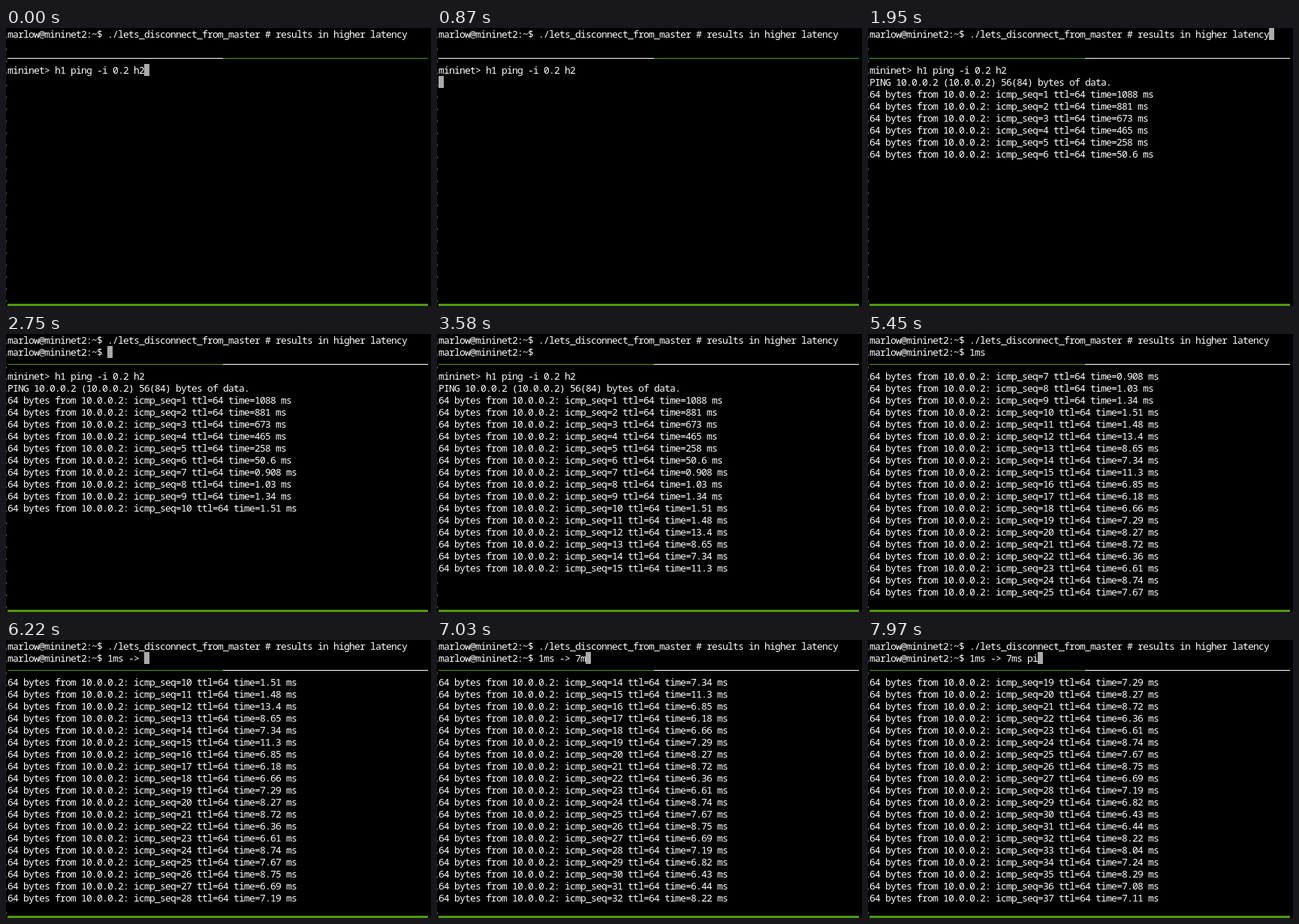
Write an HTML page that moves like this. It is 566 px wide and 371 px high and loops after 8 s.

```html
<!DOCTYPE html>
<html lang="en">
<head>
<meta charset="utf-8">
<style>
  html, body { margin: 0; width: 100%; height: 100%; overflow: hidden; background: #000; }
  div, pre { position: absolute; margin: 0; }
  pre { left: 2px; color: #fff; font: 13px/16px "Noto Sans Mono", monospace; letter-spacing: -.8px; font-variant-ligatures: none; }
  #shell { top: 0; }
  #ping { top: 48px; }
  #cursor { width: 7px; height: 16px; background: #aaa; }
  .rule { top: 40px; height: 1px; }
  #left { left: 2px; width: 287px; }
  #right { left: 289px; width: 273px; }
  #bar { left: 2px; top: 368px; width: 560px; height: 3px; background: #4e9a06; }
  #edge { left: 0; top: 0; width: 1px; height: 368px;
    background: repeating-linear-gradient(#000 0 11px, #554 11px 14px, #000 14px 16px); }
</style>
</head>
<body>
<div id="edge"></div>
<div id="left" class="rule"></div>
<div id="right" class="rule"></div>
<div id="bar"></div>
<div id="cursor"></div>
<pre id="shell"></pre>
<pre id="ping"></pre>
<script>
const LOOP = 8000, COL = 7, ROW = 16, PANE_ROW = 3;
const GREEN = '#4e9a06', WHITE = '#fff';
const $ = id => document.getElementById(id);

const prompt = 'marlow@mininet2:~$ ';
const command = prompt + './lets_disconnect_from_master # results in higher latency';
const header = ['mininet> h1 ping -i 0.2 h2', 'PING 10.0.0.2 (10.0.0.2) 56(84) bytes of data.'];

const latencies = ('1088 881 673 465 258 50.6 0.908 1.03 1.34 1.51 1.48 13.4 8.65 7.34 11.3 6.85 6.18 6.66 7.29 ' +
  '8.27 8.72 6.36 6.61 8.74 7.67 8.75 6.69 7.19 6.82 6.43 6.44 8.22 8.04 7.24 8.29 7.08 7.11').split(' ');
const replies = latencies.map((ms, i) => `64 bytes from 10.0.0.2: icmp_seq=${i + 1} ttl=64 time=${ms} ms`);

// The first six replies arrive together, the rest one by one.
const burst = 1730;
const arrivals = [2040, 2170, 2310, 2610, 2850, 3020, 3200, 3390, 3580, 3710, 3870, 4160, 4310, 4600, 4690, 4850,
  5040, 5240, 5450, 5680, 5940, 6220, 6430, 6640, 6760, 6950, 7130, 7310, 7500, 7680, 7870];

const typed = '1ms -> 7ms pi';
const keys = [4240, 4820, 5080, 5330, 5590, 5680, 6010, 6430, 6760, 7130, 7500, 7870, 7970];

const enterPing = 870, switchPane = 1840, moveCursor = 1950, enterCommand = 2310, showPrompt = 2610;
const blinks = [[3480, 3870], [5330, 5590]];

const countPast = (times, t) => times.filter(x => x <= t).length;

function pingLines(t) {
  if (t < burst) return header.slice(0, 1);
  const lines = [...header, ...replies.slice(0, 6 + countPast(arrivals, t))];
  return lines.slice(-19);
}

function cursorCell(t, lines, input) {
  if (t < enterPing) return [header[0].length, PANE_ROW];
  if (t < moveCursor) return [0, PANE_ROW + lines.length];
  if (t < enterCommand) return [command.length, 0];
  return [input.length, 1];
}

function render(t) {
  const lines = pingLines(t);
  const input = t < showPrompt ? '' : prompt + typed.slice(0, countPast(keys, t));
  $('shell').textContent = command + '\n' + input;
  $('ping').textContent = lines.join('\n');

  const topActive = t >= switchPane;
  $('left').style.background = topActive ? GREEN : WHITE;
  $('right').style.background = topActive ? WHITE : GREEN;

  const [col, row] = cursorCell(t, lines, input);
  const cursor = $('cursor').style;
  cursor.left = 2 + col * COL + 'px';
  cursor.top = row * ROW + 'px';
  cursor.visibility = blinks.some(([a, b]) => t >= a && t < b) ? 'hidden' : 'visible';
}

const start = performance.now();
function tick() {
  render((performance.now() - start) % LOOP);
  requestAnimationFrame(tick);
}
tick();
</script>
</body>
</html>
```
